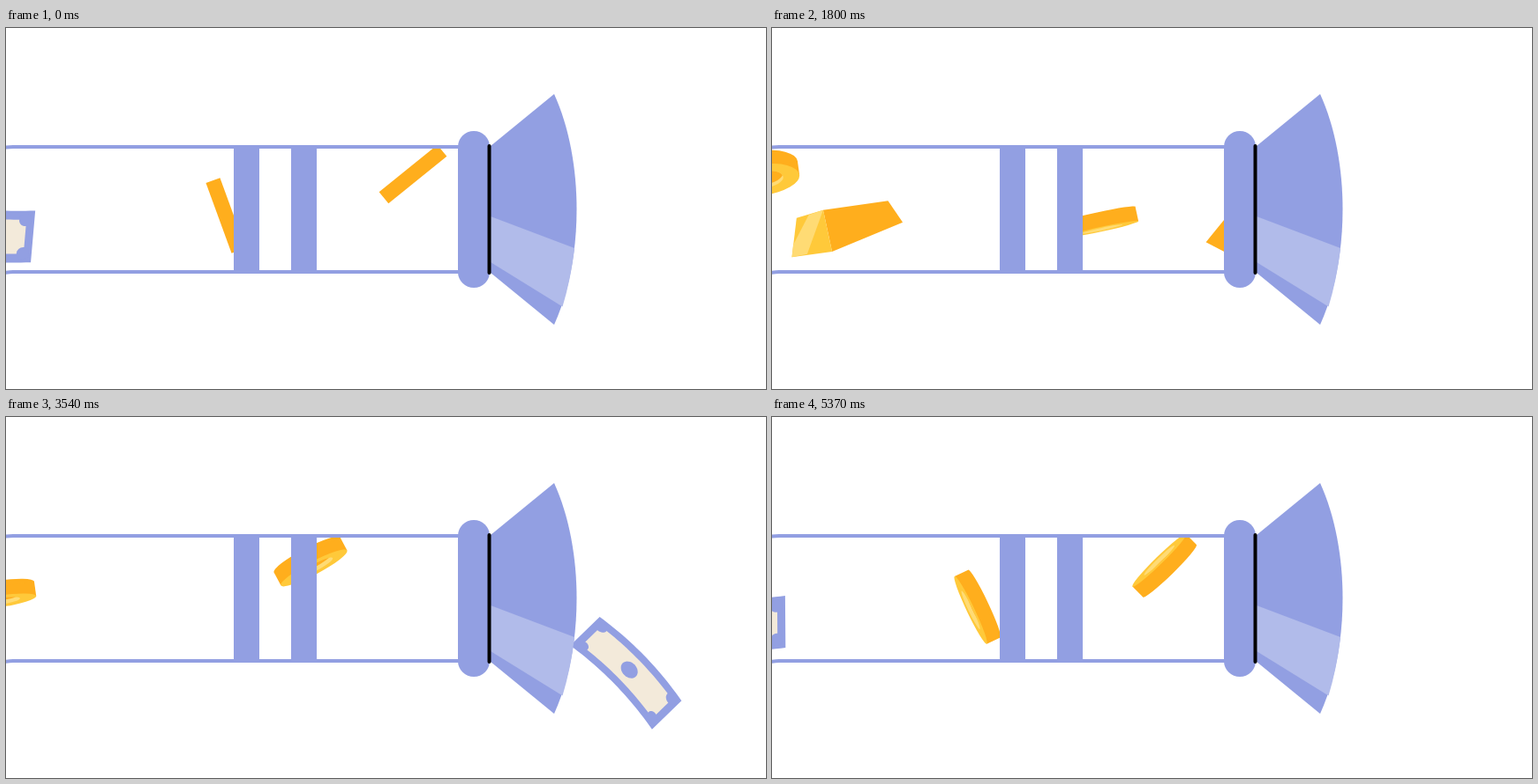
Write an HTML page with a canvas that moves like this. It is 861 px wide and 410 px high and loops after 5400 ms.

```html
<!DOCTYPE html>
<html lang="en">
<head>
<meta charset="utf-8">
<title>Money pipe</title>
<style>
  html, body { margin: 0; width: 100%; height: 100%; overflow: hidden; background: #fff; }
  canvas, svg { position: absolute; left: 0; top: 0; width: 861px; height: 410px; }
  canvas {
    clip-path: polygon(0 135px, 548px 135px, 621px 75px, 621px 0, 861px 0, 861px 410px,
      621px 410px, 621px 337px, 548px 277px, 0 277px);
  }
</style>
</head>
<body>
<canvas id="stage" width="861" height="410"></canvas>
<svg viewBox="0 0 861 410" fill="#929fe2">
  <path d="M-4 136Q3 135 8 135H514M-4 278.500Q3 277 8 277H514" fill="none" stroke="#929fe2" stroke-width="4"/>
  <path d="M258 134h29v144h-29zM323 134h29v144h-29z"/>
  <path d="M549 134L621 75C655 150 655 262 621 337L549 278z"/>
  <path d="M549 214L644 250Q640 285 630.500 316.500L549 266z" fill="#b1bbea"/>
  <rect x="512" y="117" width="36" height="178" rx="18"/>
  <path d="M547.500 134V278" stroke="#000" stroke-width="4" stroke-linecap="round"/>
</svg>
<script>
const LOOP = 5400, STEP = 30, RAD = Math.PI / 180;
const ENTRY = -90, MOUTH = 510, FAR = 800;
const SPIN = .181, TILT = .197; // degrees per ms
const BLUE = '#929fe2', CREAM = '#f3eada', GOLD = '#ffc93a', AMBER = '#ffae1d', PALE = '#ffdb74';
const UP = 35, LEVEL = 195, DOWN = 363;
const ctx = document.getElementById('stage').getContext('2d');

// top, low: walls that stop a piece; curve: how it bends away past the mouth
const coins = { draw: coin, top: 164, low: 232, curve: 1, end: 803 };
const bills = { draw: bill, top: 187, low: 237, curve: 2, end: 763 };
const ingots = { draw: ingot, top: 195, low: 230, curve: 2, end: 774 };

// Each piece is at x, y and turned by spin at the time "at"
const items = [
  { kind: coins, at: 0, x: 249, y: 213, speed: .543, slope: -.163, exit: LEVEL, spin: 160, tilt: 90 },
  { kind: coins, at: 0, x: 461, y: 166, speed: .545, slope: -.17, exit: LEVEL, spin: -129, tilt: 90 },
  { kind: bills, at: 0, x: -36, y: 235, speed: .512, slope: -.132, exit: 215, spin: 5, bow: 4 },
  { kind: bills, at: 480, x: 49, y: 226, speed: .541, slope: -.092, exit: 187, spin: -11, bow: 12 },
  { kind: ingots, at: 1260, x: 256, y: 218, speed: .54, slope: -.05, exit: UP, spin: 0 },
  { kind: coins, at: 1260, x: 84, y: 223, speed: .533, slope: -.01, exit: DOWN, spin: -20, tilt: -20 },
  { kind: ingots, at: 2340, x: 371, y: 227, speed: .54, slope: -.1, exit: UP, spin: 44 },
  { kind: coins, at: 2340, x: 279.5, y: 188, speed: .54, slope: .08, exit: DOWN, spin: 180, tilt: -8 },
  { kind: bills, at: 2340, x: 81, y: 236, speed: .521, slope: -.05, exit: 373, spin: 8.6, bow: 7 },
  { kind: coins, at: 3540, x: 345, y: 163, speed: .54, slope: .3, exit: DOWN, spin: 62, tilt: 80 },
  { kind: coins, at: 3540, x: -9, y: 201, speed: .545, slope: -.05, exit: LEVEL, spin: 82, tilt: 81 }
];

const clamp = (v, low, high) => Math.min(Math.max(v, low), high);

function place(item, dt) {
  const { kind } = item;
  const x = item.x + item.speed * dt;
  const lane = Math.min(x, MOUTH);
  const inside = clamp(item.y + item.slope * (lane - item.x), kind.top, kind.low);
  const out = (Math.max(0, x - MOUTH) / (FAR - MOUTH)) ** kind.curve;
  return { x, y: inside + (item.exit - inside) * out, out };
}

function fill(color, points) {
  ctx.fillStyle = color;
  ctx.beginPath();
  for (const p of points) ctx.lineTo(p[0], p[1]);
  ctx.fill();
}

function oval(x, rx, ry, color) {
  ctx.fillStyle = color;
  ctx.beginPath();
  ctx.ellipse(x, 0, rx, ry, 0, 0, 7);
  ctx.fill();
}

// A short cylinder seen at a tilt, its normal along the local x axis
function coin(item, dt) {
  const tilt = (item.tilt + dt * TILT) * RAD;
  const flat = Math.abs(Math.cos(tilt));
  const lean = Math.sin(tilt) * (Math.cos(tilt) < 0 ? -1 : 1);
  const half = 8.5 * lean, R = 42.5, r = 24;
  oval(-half, R * flat, R, AMBER);
  ctx.fillRect(-Math.abs(half), -R, 2 * Math.abs(half), 2 * R);
  oval(half, R * flat, R, GOLD);
  oval(half, r * flat, r, PALE);
  ctx.clip();
  oval(half - 4.5 * lean, r * flat, r, AMBER);
}

// A sheet bent along a circular arc; it curls near the mouth and tips over outside
function bill(item, dt, { x, out }) {
  const curl = Math.exp(-(((x - 480) / 80) ** 2));
  const chord = 133 * (1 - .41 * curl), bow = item.bow + 8 * curl;
  const bend = 2 * Math.atan(2 * bow / chord);
  const radius = chord / 2 / Math.sin(bend);
  const map = (s, t) => {
    const a = bend * s / 66;
    return [radius * Math.sin(a), t + radius * (Math.cos(a) - 1)];
  };
  const sheet = (w, h) => {
    const top = [], low = [];
    for (let i = -12; i <= 12; i++) {
      top.push(map(w * i / 12, -h));
      low.unshift(map(w * i / 12, h));
    }
    return top.concat(low);
  };
  const disc = (s, t, r) => Array.from({ length: 32 }, (_, i) => {
    const a = i * Math.PI / 16;
    return map(s + r * Math.cos(a), t + r * Math.sin(a));
  });
  ctx.scale(1, 1 - .46 * out);
  fill(BLUE, sheet(66, 29.5));
  fill(CREAM, sheet(57, 19.5));
  for (const s of [-56, 56]) for (const t of [-19, 19]) fill(BLUE, disc(s, t, 7));
  fill(BLUE, disc(0, 0, 10.5));
}

function ingot() {
  const a = [-58, -28], b = [-19, -50], c = [6, -31], d = [58, 22], e = [48, 50], f = [-26, 5];
  fill(AMBER, [c, d, e, f]);
  fill(GOLD, [a, b, c, f]);
  fill(PALE, [a, [-46, -35], [-8, -41], c, [-45, -16]]);
}

function render(t) {
  ctx.clearRect(0, 0, 861, 410);
  for (const item of items) {
    const { kind, at, speed } = item;
    const start = at + (ENTRY - item.x) / speed;
    const dt = start + ((t - start) % LOOP + LOOP) % LOOP - at;
    const spot = place(item, dt);
    if (spot.x > kind.end) continue;
    ctx.save();
    ctx.translate(spot.x, spot.y);
    ctx.rotate((item.spin + dt * SPIN) * RAD);
    kind.draw(item, dt, spot);
    ctx.restore();
  }
}

const begin = performance.now();
function tick() {
  const t = (performance.now() - begin) % LOOP;
  render(Math.floor(t / STEP) * STEP);
  requestAnimationFrame(tick);
}
tick();
</script>
</body>
</html>
```
